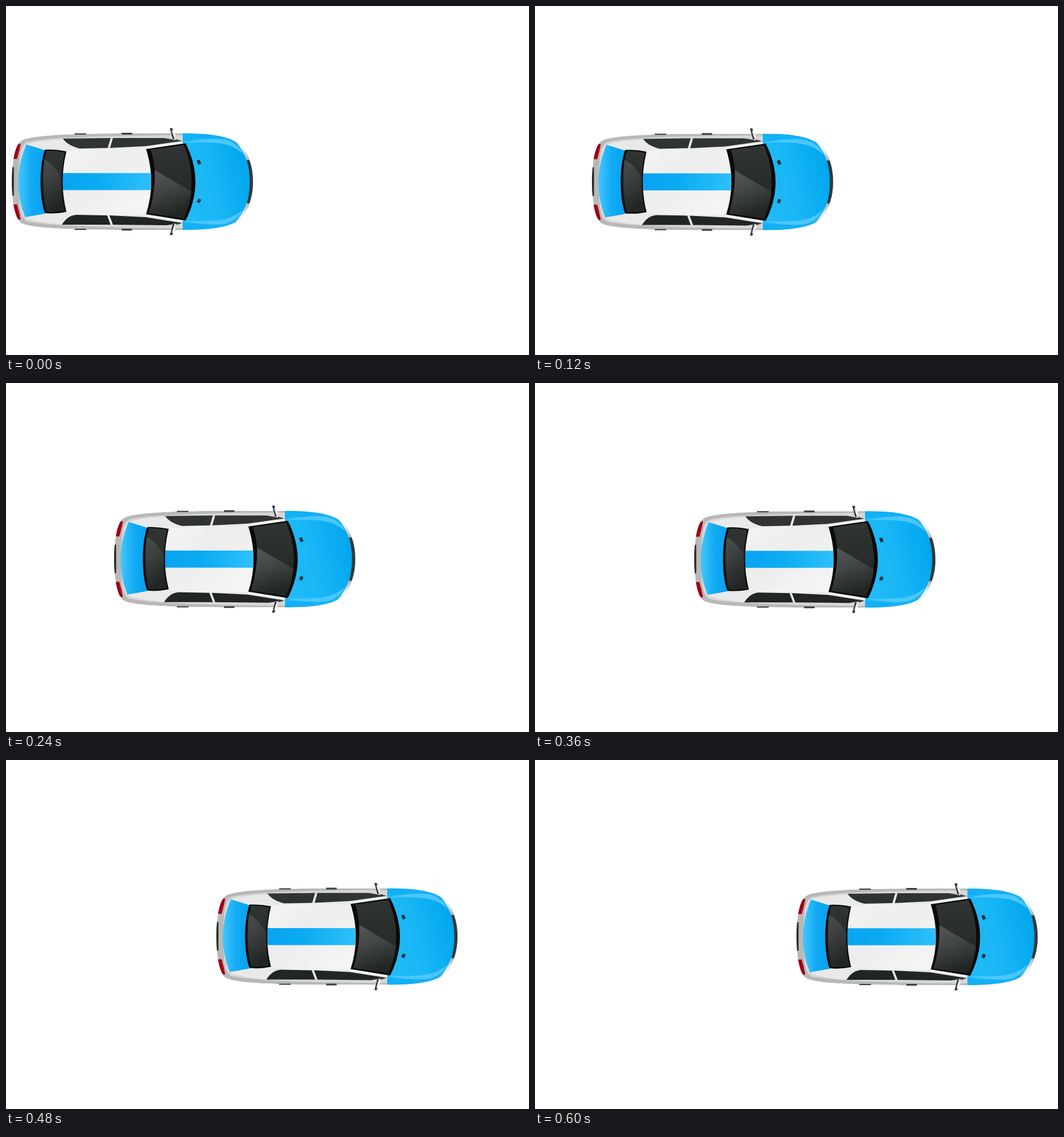
An HTML page that plays this animation: 900x600 px, repeating every 750 ms.

```html
<!DOCTYPE html>
<html lang="en">
<head>
<meta charset="utf-8">
<title>Car</title>
<style>
  html, body { margin: 0; width: 100%; height: 100%; overflow: hidden; background: #fff; }
  svg { display: block; }
</style>
</head>
<body>
<svg width="900" height="600" viewBox="0 0 900 600">
  <defs>
    <linearGradient id="hood" x1="0" y1=".7" x2="1" y2=".4">
      <stop offset="0" stop-color="#22bbf8"/><stop offset=".45" stop-color="#18b6f5"/><stop offset="1" stop-color="#00a6ee"/>
    </linearGradient>
    <linearGradient id="trunk">
      <stop offset="0" stop-color="#45c6fb"/><stop offset=".5" stop-color="#12abf4"/><stop offset="1" stop-color="#08a0ee"/>
    </linearGradient>
    <linearGradient id="stripe">
      <stop offset="0" stop-color="#0aa4f0"/><stop offset=".4" stop-color="#0aabf3"/><stop offset="1" stop-color="#2fc0fa"/>
    </linearGradient>
    <linearGradient id="roof" x1="0" y1="0" x2="1" y2="1">
      <stop offset="0" stop-color="#f4f4f4"/><stop offset=".4" stop-color="#ededed"/><stop offset="1" stop-color="#f6f6f6"/>
    </linearGradient>
    <linearGradient id="glass" x1="0" y1="0" x2="0" y2="1">
      <stop offset="0" stop-color="#303534"/><stop offset="1" stop-color="#202423"/>
    </linearGradient>
    <linearGradient id="shine" x1="0" y1="0" x2=".3" y2="1">
      <stop offset="0" stop-color="#555958"/><stop offset=".45" stop-color="#434746"/><stop offset="1" stop-color="#212524"/>
    </linearGradient>
    <linearGradient id="lamp" x1="0" y1="0" x2="1" y2="1">
      <stop offset="0" stop-color="#9a8f8a"/><stop offset=".4" stop-color="#fff"/><stop offset="1" stop-color="#8c8c8c"/>
    </linearGradient>
    <linearGradient id="metal">
      <stop offset="0" stop-color="#999"/><stop offset=".5" stop-color="#f4f4f4"/><stop offset="1" stop-color="#ccc"/>
    </linearGradient>
    <clipPath id="shell">
      <path id="outline" d="M10 302C10 270 15 242 24 234C30 225 70 219 220 219H304C350 219 378 223 396 234C416 247 425 274 425 302C425 330 416 357 396 371C378 381 350 385 304 385H220C70 385 30 379 24 371C15 362 10 334 10 302Z"/>
    </clipPath>

    <path id="handles" d="M118 219H138V221H118ZM199 218H217V221H199Z" fill="#3c3e3d"/>
    <g id="mirror">
      <path d="M282 210H287L295 228 288 230Z" fill="url(#metal)"/>
      <path d="M282 210H286L287 214 285 214 290 229H287Z" fill="#303332"/>
    </g>
    <g id="lights">
      <path d="M24 236Q13 240 12 263L19 263Q23 250 25 238Z" fill="#b3001b"/>
      <path d="M16 262Q18 246 23 238" fill="none" stroke="#7c0d18" stroke-width="2"/>
      <path d="M391 230L430 228V265H414Q408 245 391 230Z" fill="url(#lamp)"/>
    </g>
  </defs>

  <g id="car">
    <g clip-path="url(#shell)">
      <use href="#outline" fill="#b8b8b7"/>
      <path d="M22 302C22 260 24 240 36 234C70 226 150 223 304 222V382C150 381 70 377 36 370C24 364 22 344 22 302Z" fill="#d8d8d8"/>
      <path d="M26 302C26 270 28 246 36 238C60 230 100 229 130 228L304 233V372L130 377C100 376 60 374 36 365C28 358 26 334 26 302Z" fill="#e9e9e9"/>
      <path d="M304 215H396L430 262V342L396 390H304Z" fill="#12b0f6"/>
      <path d="M304 231C350 225 388 231 407 252Q421 275 421 302T407 351C388 373 350 379 304 373Z" fill="url(#hood)"/>
      <path id="gleam" d="M306 235Q342 226 374 229Q397 233 409 255Q390 238 366 236Q340 233 306 235Z" fill="#4ac7fb"/>
      <use href="#gleam" transform="matrix(1 0 0 -1 0 604)"/>
      <path d="M414 264H430V341H414Q425 302 414 264Z" fill="#363938"/>
      <path d="M9 277H13.500V326H9Z" fill="#272a2a"/>
      <use href="#lights"/>
      <use href="#lights" transform="matrix(1 0 0 -1 0 604)"/>
    </g>
    <use href="#handles"/>
    <use href="#handles" transform="matrix(1 0 0 -1 0 604)"/>

    <path d="M35 238L67 248Q56 302 67 357L33 363Q8 302 35 238Z" fill="url(#trunk)"/>

    <path d="M98 228L180 227 175 244 127 245Q106 240 98 228ZM184 227L272 227 303 232 240 241 179 244ZM96 376Q106 360 121 359L174 360 180 376ZM178 360L240 363 303 373 276 377 184 376Z" fill="url(#glass)"/>
    <path d="M274 226L303 223V233L292 231ZM280 377L303 372V381L282 380Z" fill="#d6d6d6"/>
    <path d="M292 229L303 232 290 234ZM291 371L303 373 292 377Z" fill="#3a3d3c"/>

    <path d="M103 249Q170 243 243 246Q257 302 243 358Q170 362 103 355Q91 302 103 249Z" fill="url(#roof)"/>
    <path d="M97 287.300H249Q251 302 249 316.600H97Q95 302 97 287.300Z" fill="url(#stripe)"/>

    <path d="M67 247Q84 246 104 250Q91 302 104 354Q84 358 67 356C57 330 57 274 67 247Z" fill="#090a0a"/>
    <path d="M70 249Q85 248 101 252Q90 302 101 352Q85 355 70 354C61 329 61 275 70 249Z" fill="url(#glass)"/>
    <path d="M66 264Q83 272 95 295Q94 325 100 352L71 354Q61 315 66 264Z" fill="url(#shine)" opacity=".7"/>

    <path d="M241 246L309 236Q343 302 309 369L241 358Q259 302 241 246Z" fill="#090a0a"/>
    <path d="M249 247L306 239Q333 302 306 365L245 356Q266 302 249 247Z" fill="url(#glass)"/>
    <path d="M256 282L319 319Q316 344 306 365L246 356Q257 320 256 282Z" fill="url(#shine)"/>
    <path d="M240 244L304 235M240 360L304 370" stroke="#f4f4f4" stroke-width="2.500"/>

    <path d="M328 266L333 264 336 271 331 273ZM328 337L331 331 336 333 333 339Z" fill="#173440"/>
    <use href="#mirror"/>
    <use href="#mirror" transform="matrix(1 0 0 -1 0 604)"/>
  </g>
</svg>
<script>
  const LOOP = 750, STEP = 30, LAST = 20;
  const car = document.getElementById("car");

  function draw(now) {
    const step = Math.min(LAST, Math.floor((now % LOOP) / STEP));
    car.setAttribute("transform", `translate(${step * 22} ${step * 0.1})`);
    requestAnimationFrame(draw);
  }
  draw(performance.now());
</script>
</body>
</html>
```
